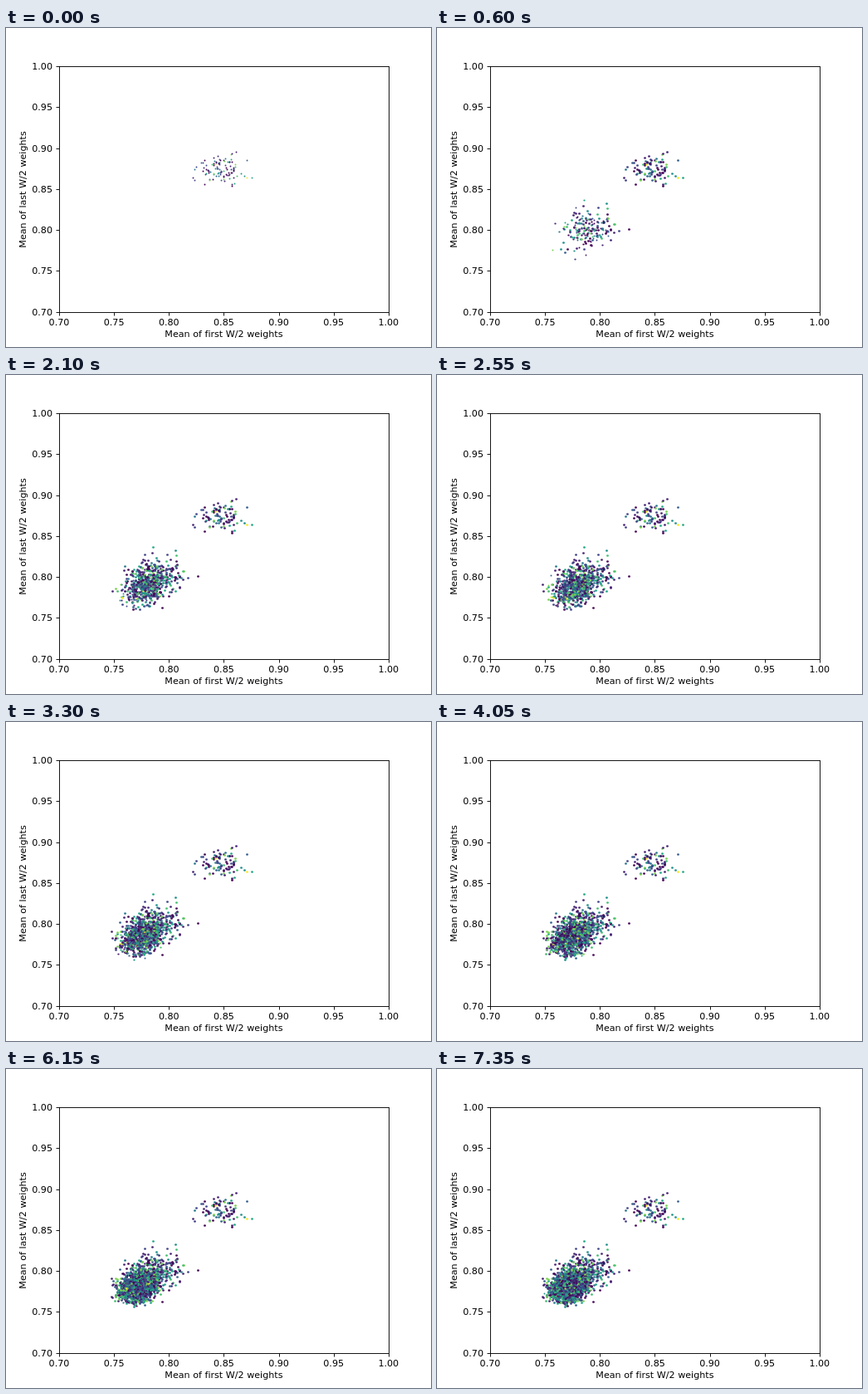
Write an HTML page with a canvas that moves like this. It is 512 px wide and 384 px high and loops after 7500 ms.

```html
<!DOCTYPE html>
<html lang="en">
<head>
<meta charset="utf-8">
<title>Weight scatter</title>
<style>
html, body { margin: 0; width: 100%; height: 100%; overflow: hidden; background: #fff; }
canvas { display: block; }
</style>
</head>
<body>
<canvas id="plot" width="512" height="384"></canvas>
<script>
const ctx = document.getElementById('plot').getContext('2d');
const STEP = 150, STEPS = 50, START_COUNT = 100, PER_STEP = 47;
const VIRIDIS = ['#440154', '#482475', '#414487', '#355f8d', '#2a788e',
  '#21918c', '#22a884', '#44bf70', '#7ad151', '#fde725'];

let seed = 11;
function random() {
  seed = (seed + 0x6d2b79f5) | 0;
  let t = Math.imul(seed ^ (seed >>> 15), 1 | seed);
  t = (t + Math.imul(t ^ (t >>> 7), 61 | t)) ^ t;
  return (((t ^ (t >>> 14)) >>> 0) + 0.5) / 4294967296;
}

const points = [];

// Adds a normally distributed cloud around (cx, cy)
function addCloud(count, born, cx, cy, sx, sy, maxRadius) {
  for (let i = 0; i < count; i++) {
    const r = Math.min(Math.sqrt(-2 * Math.log(random())), maxRadius);
    const a = random() * 2 * Math.PI;
    points.push({
      x: Math.round(cx + sx * r * Math.cos(a)) + 0.5,
      y: Math.round(cy + sy * r * Math.sin(a - 0.15)) + 0.5,
      born,
      color: VIRIDIS[Math.floor(0.7 + 8.4 * random() ** 1.8)]
    });
  }
}

addCloud(START_COUNT, 0, 260, 171, 15, 10.5, 2.7);

// Later clouds drift down to the left and tighten
for (let k = 1; k < STEPS; k++) {
  const drift = Math.exp(-k / 8), spread = Math.exp(-k / 22);
  addCloud(PER_STEP, k, 155 + 35 * drift, 264 - 30 * drift,
    7.5 + 8 * spread, 6.3 + 6.5 * spread, 3.1);
}

function text(str, x, y, align) {
  ctx.textAlign = align;
  ctx.fillText(str, x, y);
}

function line(x1, y1, x2, y2) {
  ctx.beginPath();
  ctx.moveTo(x1, y1);
  ctx.lineTo(x2, y2);
  ctx.stroke();
}

function drawAxes() {
  ctx.fillStyle = ctx.strokeStyle = '#000';
  ctx.lineWidth = 0.9;
  ctx.font = '11.11px "DejaVu Sans", sans-serif';
  ctx.letterSpacing = '0.01px'; // turns ligatures off
  ctx.strokeRect(64.5, 46.5, 397, 296);
  for (let i = 0; i <= 6; i++) {
    const label = (0.7 + i * 0.05).toFixed(2);
    const x = 64 + i * 66.133, y = 341.76 - i * 49.28;
    const tx = Math.round(x) + 0.5, ty = Math.round(y) + 0.5;
    line(tx, 342.5, tx, 346.5);
    line(60.5, ty, 64.5, ty);
    text(label, x, 358, 'center');
    text(label, 56, Math.round(y + 4), 'right');
  }
  text('Mean of first W/2 weights', 262.4, 372, 'center');
  ctx.save();
  ctx.translate(24, 194.5);
  ctx.rotate(-Math.PI / 2);
  text('Mean of last W/2 weights', 0, 0, 'center');
  ctx.restore();
}

function draw(step) {
  ctx.fillStyle = '#fff';
  ctx.fillRect(0, 0, 512, 384);
  for (const p of points) {
    if (p.born > step) break;
    // Repeated plotting thickens a dot
    const grow = Math.min(step - p.born, 2) / 2;
    ctx.fillStyle = p.color;
    ctx.beginPath();
    ctx.ellipse(p.x, p.y, 0.95 + 0.5 * grow, 0.9 + 0.35 * grow, 0, 0, 2 * Math.PI);
    ctx.fill();
  }
  drawAxes();
}

const start = performance.now();
let shown = -1;
function tick() {
  const step = Math.floor((performance.now() - start) / STEP) % STEPS;
  if (step !== shown) draw(shown = step);
  requestAnimationFrame(tick);
}
tick();
</script>
</body>
</html>
```
